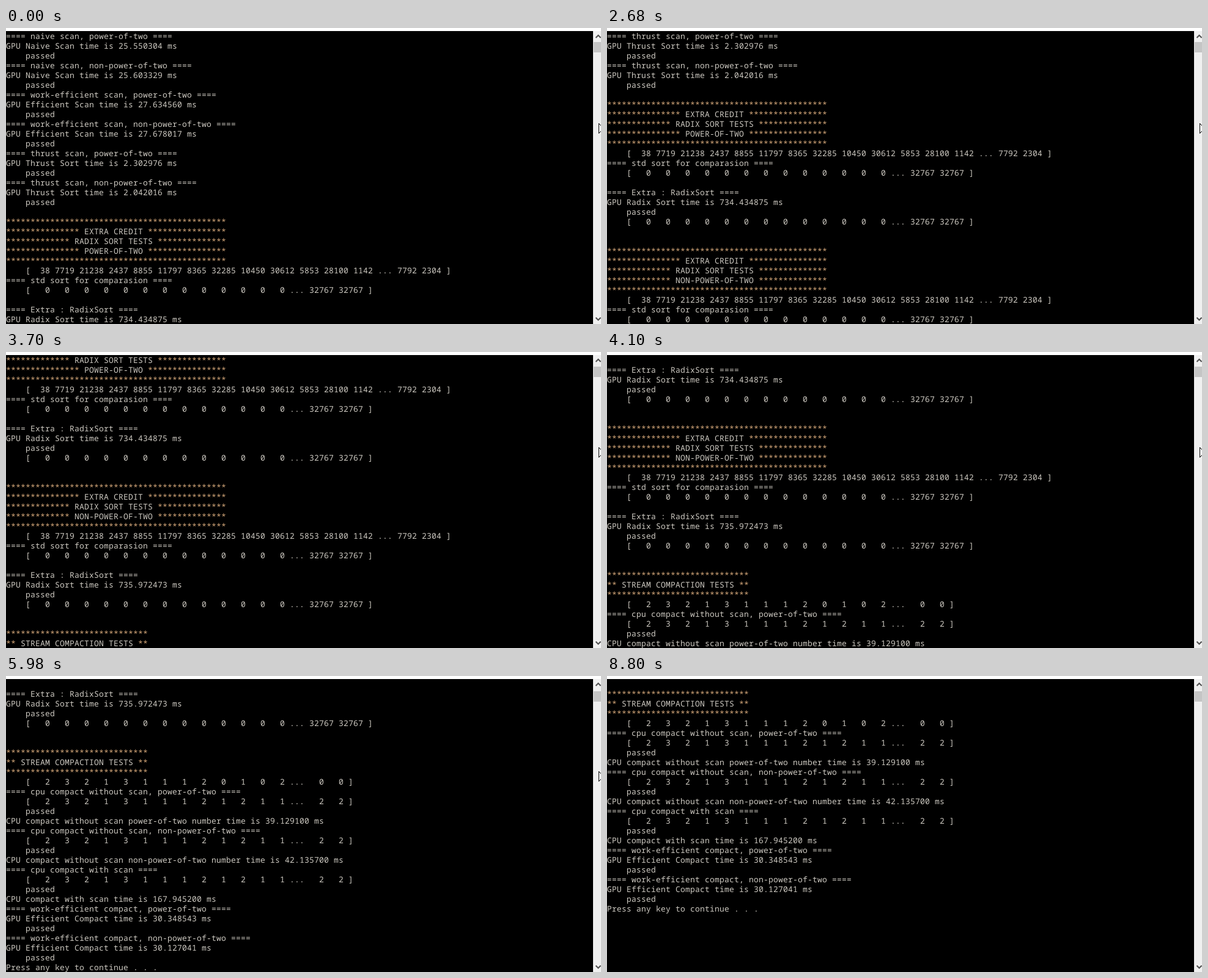
These frames come from a looping animation (973x485 px, 9.98 s). An HTML page:

```html
<!DOCTYPE html>
<html lang="en">
<head>
<meta charset="utf-8">
<title>Console scroll</title>
<style>
html, body { margin: 0; width: 100%; height: 100%; overflow: hidden; background: #000; }
svg { display: block; }
text {
  font: 13px "Noto Sans Mono", "DejaVu Sans Mono", monospace;
  letter-spacing: .2px;
  white-space: pre;
  text-rendering: geometricPrecision;
  fill: #ccc8c0;
}
.star { fill: #d9ab7c; }
.chevron { fill: none; stroke: #505050; stroke-width: 2; }
#lines, #thumb, #pointer { animation: 9980ms step-end infinite; }
#lines { animation-name: scroll; }
#thumb { animation-name: thumb; }
#pointer { animation-name: pointer; }

/* Each wheel tick moves three 16px rows. */
@keyframes scroll {
  0% { transform: translateY(0); }
  4.609% { transform: translateY(-48px); }
  5.911% { transform: translateY(-96px); }
  7.414% { transform: translateY(-144px); }
  26.853% { transform: translateY(-192px); }
  28.356% { transform: translateY(-240px); }
  32.464% { transform: translateY(-288px); }
  37.074% { transform: translateY(-336px); }
  38.276% { transform: translateY(-384px); }
  41.082% { transform: translateY(-432px); }
  48.296% { transform: translateY(-480px); }
  49.699% { transform: translateY(-576px); }
  57.114% { transform: translateY(-624px); }
  59.919% { transform: translateY(-672px); }
  64.328% { transform: translateY(-720px); }
  67.334%, 100% { transform: translateY(-768px); }
}
@keyframes thumb {
  0% { transform: translateY(0); }
  37.074% { transform: translateY(1px); }
  59.919%, 100% { transform: translateY(2px); }
}
@keyframes pointer {
  0% { transform: translateY(0); visibility: visible; }
  86.673% { transform: translateY(1px); visibility: visible; }
  88.176%, 100% { transform: translateY(1px); visibility: hidden; }
}
</style>
</head>
<body>
<svg width="973" height="485" viewBox="0 0 973 485">
  <rect width="973" height="485"/>
  <g id="lines"></g>
  <rect width="973" height="5" fill="#fff"/>
  <rect x="960" y="5" width="13" height="480" fill="#f0f0f0"/>
  <rect id="thumb" x="961" y="23" width="12" height="17" fill="#c5c5c5"/>
  <path class="chevron" d="M964.5 16L968.5 12L972.5 16M964.5 474.5L968.5 478.5L972.5 474.5"/>
  <g id="pointer" shape-rendering="crispEdges">
    <path d="M969 156h1v1h1v1h1v1h1v11h-1v1h-1v1h-1v1h-1z"/>
    <path d="M970 158h1v1h1v1h1v9h-1v1h-1v1h-1z" fill="#fff"/>
  </g>
</svg>
<script>
const stars = n => '*'.repeat(n);
const title = s => `==== ${s} ====`;
const passed = '    passed';
const list = (head, tail) => {
  const pad = s => s.split(' ').map(v => v.padStart(3)).join(' ');
  return `    [ ${pad(head)} ... ${pad(tail)} ]`;
};

const zeros = list(Array(13).fill(0).join(' '), '32767 32767');
const unsorted = list('38 7719 21238 2437 8855 11797 8365 32285 10450 30612 5853 28100 1142', '7792 2304');
const compacted = list('2 3 2 1 3 1 1 1 2 1 2 1 1', '2 2');

const timed = (name, label, ms) => [title(name), `GPU ${label} time is ${ms} ms`, passed];
const banner = s => {
  const left = Math.floor((43 - s.length) / 2);
  return `${stars(left)} ${s} ${stars(43 - s.length - left)}`;
};
const radix = (size, ms) => [
  stars(45), banner('EXTRA CREDIT'), banner('RADIX SORT TESTS'), banner(size), stars(45),
  unsorted, title('std sort for comparasion'), zeros, '',
  ...timed('Extra : RadixSort', 'Radix Sort', ms), zeros, '', ''
];
const compact = (name, label, ms) =>
  [title(`cpu compact ${name}`), compacted, passed, `CPU compact ${label} time is ${ms} ms`];

const rows = [
  ...timed('naive scan, power-of-two', 'Naive Scan', '25.550304'),
  ...timed('naive scan, non-power-of-two', 'Naive Scan', '25.603329'),
  ...timed('work-efficient scan, power-of-two', 'Efficient Scan', '27.634560'),
  ...timed('work-efficient scan, non-power-of-two', 'Efficient Scan', '27.678017'),
  ...timed('thrust scan, power-of-two', 'Thrust Sort', '2.302976'),
  ...timed('thrust scan, non-power-of-two', 'Thrust Sort', '2.042016'),
  '',
  ...radix('POWER-OF-TWO', '734.434875'),
  ...radix('NON-POWER-OF-TWO', '735.972473'),
  stars(29), '** STREAM COMPACTION TESTS **', stars(29),
  list('2 3 2 1 3 1 1 1 2 0 1 0 2', '0 0'),
  ...compact('without scan, power-of-two', 'without scan power-of-two number', '39.129100'),
  ...compact('without scan, non-power-of-two', 'without scan non-power-of-two number', '42.135700'),
  ...compact('with scan', 'with scan', '167.945200'),
  ...timed('work-efficient compact, power-of-two', 'Efficient Compact', '30.348543'),
  ...timed('work-efficient compact, non-power-of-two', 'Efficient Compact', '30.127041'),
  'Press any key to continue . . .'
];

document.getElementById('lines').innerHTML = rows.map((row, i) =>
  `<text x="0" y="${18 + 16 * i}" xml:space="preserve">${
    row.replace(/\*+/g, '<tspan class="star">$&</tspan>')}</text>`).join('');
</script>
</body>
</html>
```
